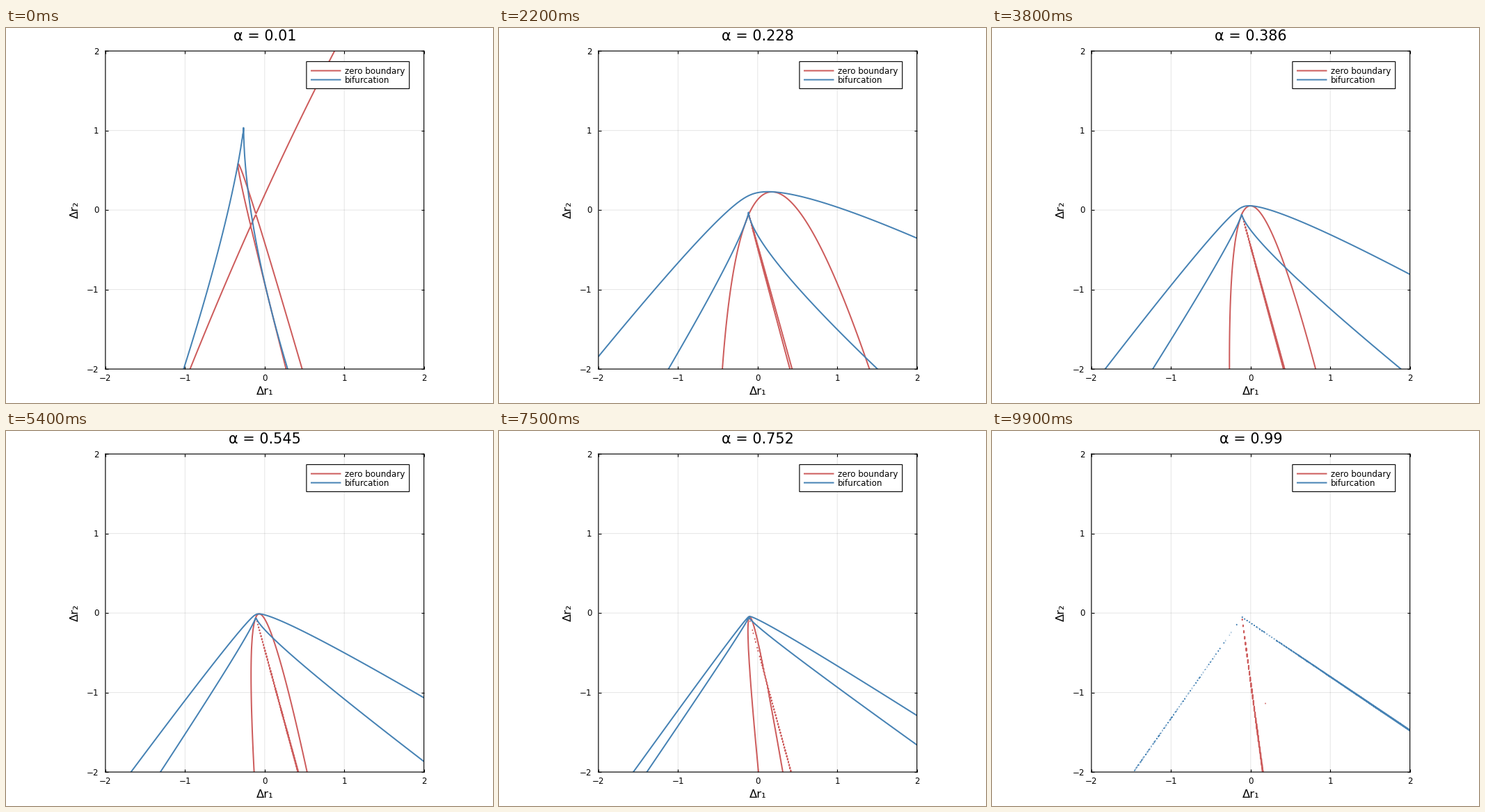
Animation, 700 px wide and 540 px high, one loop 10 s. Source, as a matplotlib script:

```python
import numpy as np
import matplotlib.pyplot as plt
from matplotlib.animation import FuncAnimation
from matplotlib.patches import Rectangle

W, H, DPI = 700, 540, 100
FRAMES = 100
LEFT, TOP, WIDE, TALL = 142.9, 33.1, 457.8, 458
RED, BLUE = "indianred", "steelblue"
PX = 72 / DPI  # one pixel in points
THIN = 1.15 * PX
SMALL, LABEL, TITLE = 8.55, 11.75, 14.95

plt.rcParams["font.family"] = "DejaVu Sans"
plt.rcParams["path.simplify"] = False
plt.rcParams["path.snap"] = False

# Equilibria solve  d = k * (A1 s + A2 t + B1 s^2 + B2 t^2 + M s t)
ORIGIN = np.array([-0.11, -0.052])
A1, A2 = np.array([0.2942, 0.6545]), np.array([-0.05016, 0.161])
B1, B2 = np.array([0.1348, -1.0]), np.array([0.2721, -1.0])
M = np.array([-2.0415, -0.3449])

axis = np.linspace(-2, 2, 400)
X, Y = np.meshgrid(axis, axis)


def cross(u, v):
    return u[0] * v[1] - u[1] * v[0]


def parabola(d, a, b):
    """Implicit form of the curve a s + b s^2."""
    return cross(d, b) ** 2 + cross(d, a) * cross(a, b)


def mul(*forms):
    """Product of binary forms given by their coefficients."""
    out = np.array([1.0])
    for f in forms:
        out = np.convolve(out, f)
    return out


Q = 4 * mul(B1, B2) - mul(M, M)
G = 2 * (mul(M, A1, A2) - mul(B1, A2, A2) - mul(B2, A1, A1))


def fold(d):
    """Discriminant of the cubic whose roots are the tangents through d."""
    x, y = d
    c0 = G[0] - 2 * x * Q[0]
    c1 = G[1] - 2 * (x * Q[1] + y * Q[0])
    c2 = G[2] - 2 * (x * Q[2] + y * Q[1])
    c3 = G[3] - 2 * y * Q[2]
    return (18 * c0 * c1 * c2 * c3 - 4 * c1**3 * c3 + c1**2 * c2**2
            - 4 * c0 * c2**3 - 27 * c0**2 * c3**2)


fig = plt.figure(figsize=(W / DPI, H / DPI), dpi=DPI, facecolor="white")
ax = fig.add_axes([LEFT / W, 1 - (TOP + TALL) / H, WIDE / W, TALL / H])
ax.set(xlim=(-2, 2), ylim=(-2, 2), xticks=range(-2, 3), yticks=range(-2, 3))
ax.tick_params(direction="in", length=4 * PX, width=THIN, top=True, right=True,
               labelbottom=False, labelleft=False)
ax.set_axisbelow(True)
ax.grid(color="black", alpha=0.1, linewidth=PX)
for spine in ax.spines.values():
    spine.set(linewidth=THIN, snap=False)

# Overlay in pixel units for the text and the legend
top = fig.add_axes([0, 0, 1, 1], zorder=5)
top.set(xlim=(0, W), ylim=(H, 0))
top.axis("off")


def write(x, y, s, size, ha="center", **kw):
    return top.text(x, y, s, fontsize=size, ha=ha, va="baseline", **kw)


for v in range(-2, 3):
    name = str(v).replace("-", "\u2212")
    part = (v + 2) / 4
    write(LEFT + part * WIDE, 507.5, name, SMALL)
    write(133.5, TOP + (1 - part) * TALL + 4.4, name, SMALL, ha="right")

write(372, 528.5, "Δr₁", LABEL)
write(103.5, 262, "Δr₂", LABEL, rotation=90, rotation_mode="anchor")
title = write(372, 18, "", TITLE)

top.add_patch(Rectangle((431.9, 48.4), 147.8, 39, facecolor="white",
                        edgecolor="black", linewidth=THIN, snap=False))
for y, color, name in [(61.5, RED, "zero boundary"), (74.5, BLUE, "bifurcation")]:
    top.plot([438, 481.5], [y, y], color=color, linewidth=2 * PX,
             solid_capstyle="butt", snap=False)
    write(487.3, y + 4.3, name, SMALL, ha="left")

curves = []


def update(i):
    while curves:
        curves.pop().remove()
    alpha = 0.01 + 0.98 * i / (FRAMES - 1)
    k = (1 - alpha) ** 2 / alpha
    d = (X - ORIGIN[0]) / k, (Y - ORIGIN[1]) / k
    zero = parabola(d, A1, B1) * parabola(d, A2, B2)
    for z, color in [(zero, RED), (fold(d), BLUE)]:
        cs = ax.contour(X, Y, z, levels=[0], colors=color,
                        linewidths=2 * PX, linestyles="solid")
        cs.set(capstyle="round", joinstyle="round")
        curves.append(cs)
    title.set_text(f"α = {round(alpha, 3)}")
    return [title, *curves]


anim = FuncAnimation(fig, update, frames=FRAMES, init_func=lambda: [],
                     interval=100, repeat=True, repeat_delay=0, blit=False)
plt.show()
```
